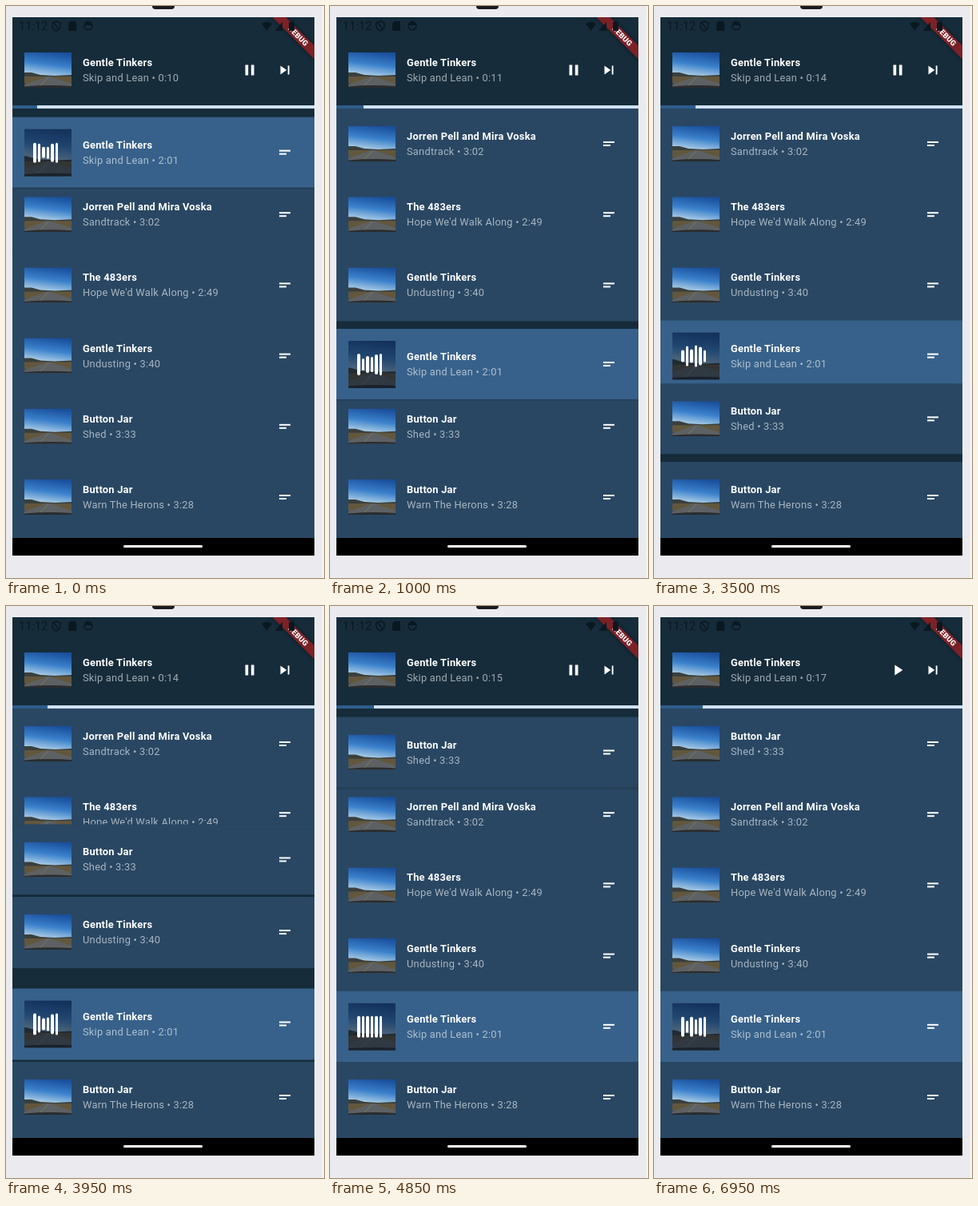
An HTML page for the animation above (7000 ms loop, 398 by 714 pixels).

```html
<!DOCTYPE html>
<html lang="en">
<head>
<meta charset="utf-8">
<title>Playlist</title>
<style>
html, body { margin: 0; width: 100%; height: 100%; overflow: hidden; background: #ebebef; }
#stage { position: relative; width: 398px; height: 714px; overflow: hidden;
  font: 12.86px/18px Roboto, sans-serif; letter-spacing: .23px; color: #fff; }
#stage div, #stage svg { position: absolute; }
#edge { left: 396px; top: 0; width: 2px; height: 714px; background: #f6f6f8; }
#notch { left: 183px; top: -8.4px; width: 28px; height: 12px; border-radius: 4px; background: #1b1b1f; }
#screen { left: 8px; top: 14px; width: 378px; height: 672px; overflow: hidden; background: #162c3b; }
#list { left: 0; top: 114px; width: 378px; height: 536px; overflow: hidden; }
.row { left: 0; top: 0; width: 378px; height: 89px; background: #294763; }
.row.active { background: #37618a; }
.row.lifted { z-index: 2; height: 88.2px; box-shadow: 0 1px 3px rgba(0, 0, 0, .28); }
#header { top: 22px; background: none; }
.title, .sub { left: 88px; white-space: nowrap; }
.title { top: 26px; font-weight: 700; }
.sub { top: 44.5px; color: rgba(255, 255, 255, .6); }
.photo { left: 14.5px; top: 21.5px; width: 59px; height: 44px; }
.active .photo { top: 14.5px; height: 59px; }
.shade { left: 14.5px; top: 14.5px; width: 59px; height: 59px; background: rgba(14, 26, 42, .56); }
.grip { left: 333.5px; width: 14.7px; height: 1.9px; top: 41.35px; background: #fff; }
.grip + .grip { width: 9.2px; top: 45px; }
.bar { width: 3.4px; border-radius: 2px; background: #fff; }
#track { left: 0; top: 110px; width: 378px; height: 3.7px; background: #cfe1f2; }
#played { left: 0; top: 0; height: 100%; background: #2d5d8b; }
#nav { left: 0; top: 650px; width: 378px; height: 22px; background: #000; }
#pill { left: 139px; top: 8.8px; width: 99px; height: 3.7px; border-radius: 2px; background: #fff; }
#clock { left: 8px; top: 2px; font-size: 14.2px; color: #0a1820; }
#icons { left: 0; top: 0; }
#ribbon { left: 296px; top: 16.3px; width: 120px; height: 11.5px; transform: rotate(45deg);
  background: #7b2127; box-shadow: 0 0 5px rgba(0, 0, 0, .5); text-indent: 5px;
  font-size: 9.4px; line-height: 11.5px; font-weight: 900; letter-spacing: .2px; text-align: center; }
</style>
</head>
<body>
<div id="stage">
  <svg width="0" height="0">
    <defs>
      <linearGradient id="sky" x1=".65" x2=".4" y2="1">
        <stop stop-color="#1a4f9c"/><stop offset=".5" stop-color="#3a80cb"/><stop offset="1" stop-color="#b4d3e8"/>
      </linearGradient>
      <symbol id="road" viewBox="0 0 59 44" preserveAspectRatio="xMidYMid slice">
        <path fill="url(#sky)" d="M0 0H59V30H0z"/>
        <path fill="#3a3f3c" d="M0 25L9 25 20 28 38 29 59 28V32H0z"/>
        <path fill="#62573d" d="M0 30H59V39H0z"/>
        <path fill="#5d6163" d="M29 30H32L59 39V44H0V40z"/>
        <path stroke="#8f8558" stroke-width=".7" d="M30 31L19 42"/>
        <path fill="#2a2c2f" d="M0 42.500Q30 40 59 42V44H0z"/>
      </symbol>
    </defs>
  </svg>
  <div id="edge"></div>
  <div id="notch"></div>
  <div id="screen">
    <div id="header" class="row"></div>
    <div id="track"><div id="played"></div></div>
    <div id="list"></div>
    <div id="nav"><div id="pill"></div></div>
    <div id="clock">11:12</div>
    <div id="ribbon">DEBUG</div>
    <svg id="icons" width="378" height="114" fill="#0a1820">
      <path d="M55 5l5 2v4q0 4-5 6-5-2-5-6V7zM52 7l6 8" fill="none" stroke="#0a1820" stroke-width="1.4"/>
      <path d="M73 5h7v12H70V8z"/>
      <circle cx="95" cy="11" r="5" fill="none" stroke="#0a1820" stroke-width="1.4"/>
      <path d="M90 10a5 5 0 0 1 10 0z"/>
      <path d="M312 8q6.500-5 13 0l-6.500 9zM328 17l10-11v11zM346 6h2V5h3v1h2v11h-7z"/>
      <path id="pause" fill="#fff" d="M291.500 59.600h3.700v12.800h-3.700zM298.800 59.600h3.700v12.800h-3.700z"/>
      <path id="play" fill="#fff" d="M293.300 59.600L303.400 66 293.300 72.400z"/>
      <path fill="#fff" d="M335.500 60.500L343.300 66 335.500 71.500zM344.700 60.500h1.900v11h-1.900z"/>
    </svg>
  </div>
</div>
<script>
const PITCH = 88.2, LOOP = 7000, PAUSED_AT = 6650;
const $ = id => document.getElementById(id);
const songs = [
  ["Gentle Tinkers", "Skip and Lean • 2:01"],
  ["Jorren Pell and Mira Voska", "Sandtrack • 3:02"],
  ["The 483ers", "Hope We'd Walk Along • 2:49"],
  ["Gentle Tinkers", "Undusting • 3:40"],
  ["Button Jar", "Shed • 3:33"],
  ["Button Jar", "Warn The Herons • 3:28"],
  ["", ""]
];
// Cycles of each visualizer bar per 2850 ms
const beats = [3, 4, 5, 2, 6, 3];
// Dragged tile paths: [time, offset from the list top]
const dragDown = [[0, 10.5], [100, 26], [368, 132], [500, 179], [625, 220.5], [800, 275], [1000, 275], [1250, 3 * PITCH]];
const dragUp = [[3400, 4 * PITCH], [3500, 343.5], [3730, 308.7], [3798, 220.5], [3950, 145], [3975, 132],
  [4200, 44], [4450, 10.5], [5000, 10.5], [5250, 0]];

const content = ([title, sub]) =>
  `<svg class="photo"><use href="#road"/></svg><div class="title">${title}</div><div class="sub">${sub}</div>`;

const rows = songs.map((song, i) => {
  const row = document.createElement("div");
  row.className = i ? "row" : "row active";
  row.innerHTML = content(song) + '<div class="grip"></div><div class="grip"></div>';
  $("list").append(row);
  return row;
});
rows[6].innerHTML = "";
rows[0].insertAdjacentHTML("beforeend", '<div class="shade"></div>' +
  beats.map((_, i) => `<div class="bar" style="left:${26.2 + i * 5.52}px"></div>`).join(""));
const bars = rows[0].querySelectorAll(".bar");
$("header").innerHTML = content(["Gentle Tinkers", ""]);
const elapsed = $("header").querySelector(".sub");

function along(keys, t) {
  if (t <= keys[0][0]) return keys[0][1];
  for (let i = 1; i < keys.length; i++) {
    const [t0, y0] = keys[i - 1], [t1, y1] = keys[i];
    if (t < t1) return y0 + (y1 - y0) * (t - t0) / (t1 - t0);
  }
  return keys[keys.length - 1][1];
}

function draw(t) {
  const shift = start => {
    const p = Math.min(1, Math.max(0, (t - start) / 250));
    return PITCH * p * p * (3 - 2 * p);
  };
  const tops = [
    along(dragDown, t) + shift(3730),
    PITCH - shift(170) + shift(4200),
    2 * PITCH - shift(368) + shift(3975),
    3 * PITCH - shift(625) + shift(3798),
    along(dragUp, t),
    5 * PITCH,
    6 * PITCH
  ];
  // Lower rows cover the slight overlap of the rows above them
  rows.forEach((row, i) => {
    row.style.transform = `translateY(${tops[i]}px)`;
    row.style.zIndex = Math.round(tops[i]);
  });
  const lift = (row, on) => {
    row.classList.toggle("lifted", on);
    if (on) row.style.zIndex = 1000;
  };
  lift(rows[0], t < 1250);
  lift(rows[4], t > 3400 && t < 5250);

  const playTime = Math.min(t, PAUSED_AT);
  bars.forEach((bar, i) => {
    const h = 20.5 + 6.5 * Math.cos(2 * Math.PI * beats[i] * (playTime - 2000) / 2850);
    bar.style.height = h + "px";
    bar.style.top = 44.5 - h / 2 + "px";
  });

  const seconds = Math.floor(10.98 + playTime / 985);
  elapsed.textContent = "Skip and Lean • 0:" + seconds;
  $("played").style.width = 378 * seconds / 121 + "px";
  const paused = t >= PAUSED_AT;
  $("pause").style.display = paused ? "none" : "";
  $("play").style.display = paused ? "" : "none";
}

const start = performance.now();
function tick() {
  draw((performance.now() - start) % LOOP);
  requestAnimationFrame(tick);
}
tick();
</script>
</body>
</html>
```
